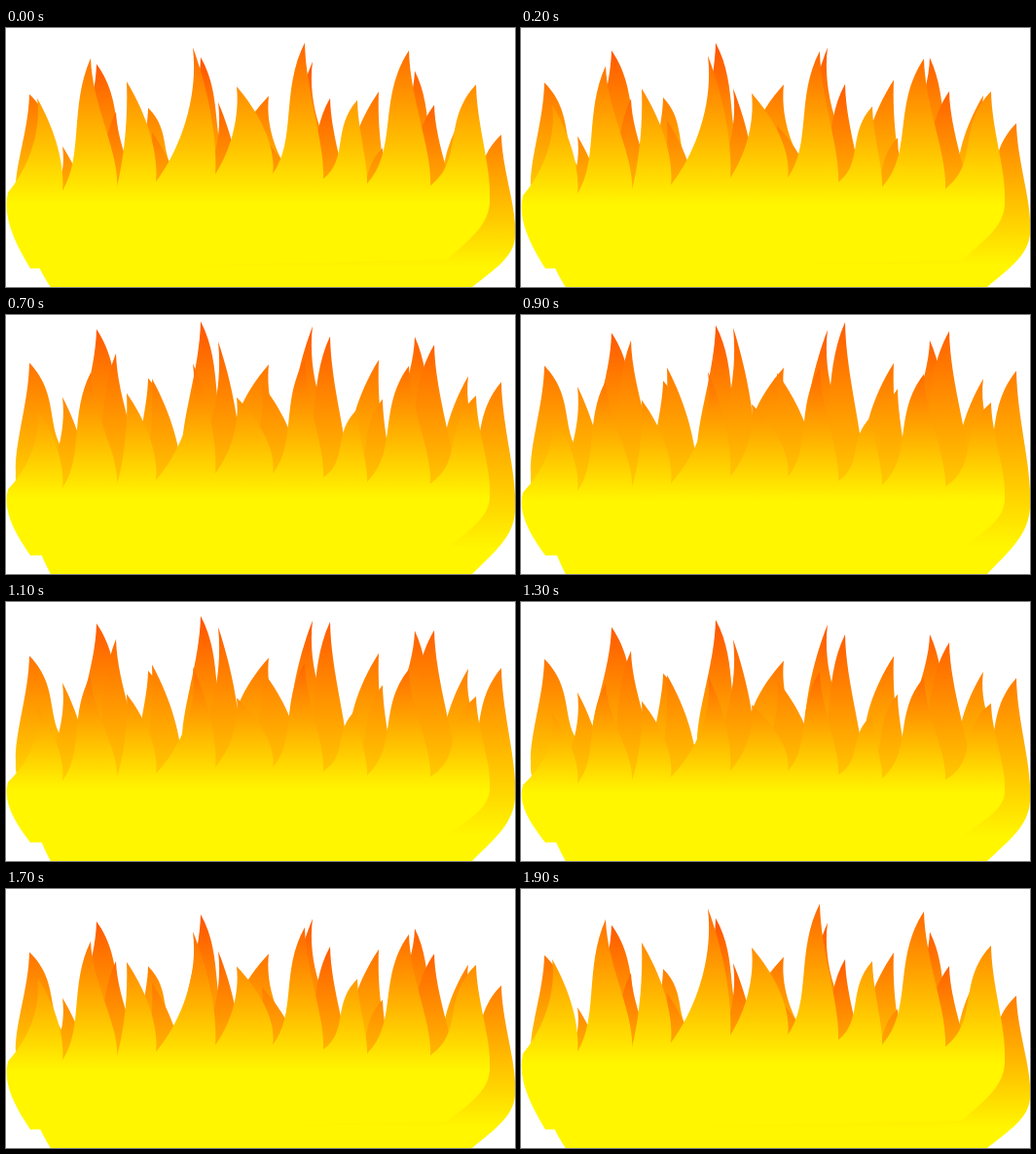
An HTML page with a canvas for the animation above (2 s loop, 523 by 266 pixels).

```html
<!DOCTYPE html>
<html lang="en">
<head>
<meta charset="utf-8">
<title>Flames</title>
<style>
  html, body { margin: 0; width: 100%; height: 100%; overflow: hidden; background: #fff; }
  canvas { display: block; }
</style>
</head>
<body>
<canvas id="stage" width="523" height="266"></canvas>
<script>
const ctx = document.getElementById('stage').getContext('2d');
const STEP = 100;
const STEPS = 20;
const LAST = STEPS - 1;

// Tip, then the valley to its right.
const FLAMES = [
  { tip: [32, 72], valley: [58, 167], lean: 'left' },
  { tip: [87, 31], valley: [114, 163], lean: 'right' },
  { tip: [124, 55], valley: [154, 158], lean: 'left' },
  { tip: [192, 20], valley: [215, 150], lean: 'left' },
  { tip: [237, 60], valley: [274, 150], lean: 'left' },
  { tip: [307, 15], valley: [326, 155], lean: 'right' },
  { tip: [361, 74], valley: [371, 160], lean: 'right' },
  { tip: [414, 23], valley: [436, 162], lean: 'right' },
  { tip: [483, 58], valley: [497, 172], lean: 'right' }
];

// How far each edge bows, as shares of its width, near the tip and near the valley.
const BOW = {
  left: { rise: [-0.15, 0.7], fall: [0.75, -0.1] },
  right: { rise: [0.75, 0.75], fall: [0.05, -0.1] }
};

// Back to front. The shape's anchor line stays at pivot while its height varies.
const LAYERS = [
  { flip: -1, x: 507, pivot: 235, anchor: 247, size: 1.01, top: '#ff5200', fade: 232,
    low: 0.875, high: 1, peak: 4 },
  { flip: 1, x: 26, pivot: 266, anchor: 238, size: 1.16, top: '#ff5a00', fade: 214,
    low: 0.75, high: 1, peak: 9 },
  { flip: 1, x: 0, pivot: 247, anchor: 247, size: 1, top: '#ff6400', fade: 180,
    low: 1, high: 0.738, peak: 14 }
];

function controls([tx, ty], [vx, vy], [nearTip, nearValley]) {
  const w = vx - tx;
  const h = vy - ty;
  return [
    [tx + nearTip * w, ty + 0.36 * h],
    [vx - nearValley * w, vy - 0.26 * h]
  ];
}

function buildShape() {
  const path = new Path2D();
  let valley = [2, 169];
  path.moveTo(25, 247);
  path.bezierCurveTo(10, 222, -4, 195, ...valley);
  for (const flame of FLAMES) {
    const { rise, fall } = BOW[flame.lean];
    const [upper, lower] = controls(flame.tip, valley, rise);
    path.bezierCurveTo(...lower, ...upper, ...flame.tip);
    const [first, second] = controls(flame.tip, flame.valley, fall);
    path.bezierCurveTo(...first, ...second, ...flame.valley);
    valley = flame.valley;
  }
  path.bezierCurveTo(499, 200, 480, 214, 453, 238);
  path.closePath();
  return path;
}

function heightAt({ low, high, peak }, step) {
  const share = step <= peak ? step / peak : (LAST - step) / (LAST - peak);
  return low + (high - low) * share;
}

function gradient({ top, fade }) {
  const fill = ctx.createLinearGradient(0, 15, 0, fade);
  fill.addColorStop(0, top);
  fill.addColorStop(1, '#fff600');
  return fill;
}

const shape = buildShape();
const fills = LAYERS.map(gradient);

function draw(step) {
  ctx.setTransform(1, 0, 0, 1, 0, 0);
  ctx.fillStyle = '#fff';
  ctx.fillRect(0, 0, 523, 266);
  LAYERS.forEach((layer, i) => {
    const k = layer.size * heightAt(layer, step);
    ctx.setTransform(layer.flip, 0, 0, k, layer.x, layer.pivot - k * layer.anchor);
    ctx.fillStyle = fills[i];
    ctx.fill(shape);
  });
}

const begin = performance.now();

function tick() {
  const elapsed = performance.now() - begin;
  draw(Math.floor(elapsed / STEP) % STEPS);
  requestAnimationFrame(tick);
}

tick();
</script>
</body>
</html>
```
